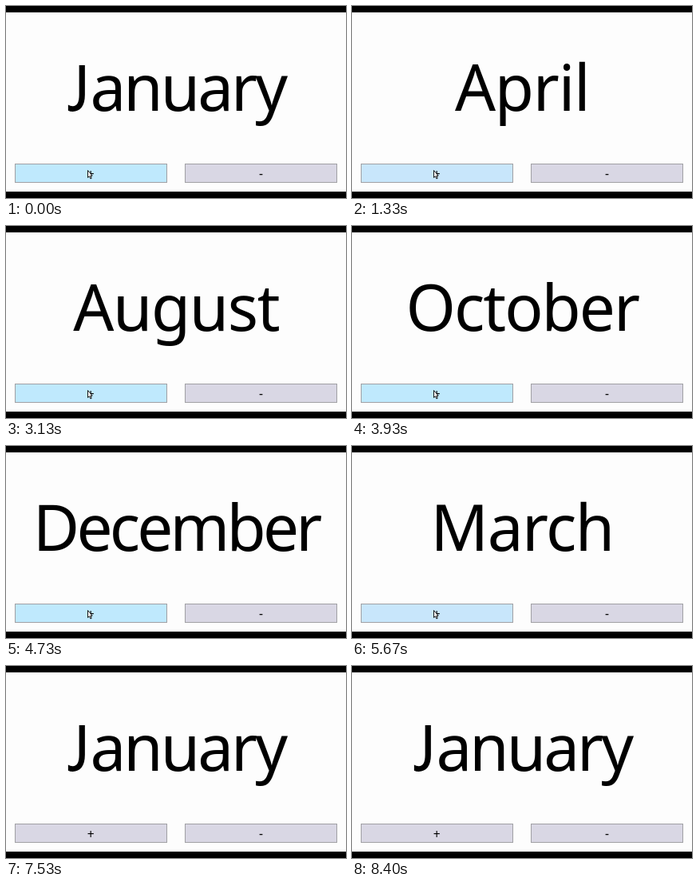
Write an HTML page that moves like this. It is 426x240 px and loops after 8.47 s.

```html
<!DOCTYPE html>
<html lang="en">
<head>
<meta charset="utf-8">
<title>Month stepper</title>
<style>
  html, body { margin: 0; width: 100%; height: 100%; overflow: hidden; background: #000; }
  svg { display: block; width: 100vw; height: 100vh; }
  text { font-family: "Noto Sans", "Open Sans", sans-serif; }
  .month { font-size: 80px; }
  .label { font-size: 15.5px; text-anchor: middle; }
  .button { stroke: #a0a0a4; stroke-width: 1; }
</style>
</head>
<body>
<svg id="stage" viewBox="0 0 426 240">
  <rect y="8" width="426" height="224" fill="#fdfdfd"/>
  <g id="months"></g>
  <rect id="plus" class="button" x="11.5" y="197.5" width="190" height="23"/>
  <rect id="minus" class="button" x="224.5" y="197.5" width="190" height="23"/>
  <text class="label" x="106.3" y="215.6">+</text>
  <text class="label" x="319.5" y="215.2">-</text>
  <path id="cursor" d="M0 0V9L1.9 7.3L3.4 10.4L4.7 9.8L3.3 6.7H5.7Z"
    fill="#fff" stroke="#000" stroke-width=".9"/>
  <rect width="426" height="8"/>
  <rect y="232" width="426" height="8"/>
</svg>
<script>
const LOOP = 8470, FRAME = LOOP / 127;
const CENTER = 213.2, BASELINE = 131, J_WIDTH = 29;
const PRESS = 140;
const COLORS = { idle: '#d9d7e4', hover: '#bfe9fd', pressed: '#c8e6fb' };

// name and letter spacing
const MONTHS = [
  ['January', -3], ['February', -2.6], ['March', -1.5], ['April', -1.2],
  ['May', -1.2], ['June', -2.8], ['July', -1.5], ['August', -1.4],
  ['September', -2.9], ['October', -2], ['November', -2.6], ['December', -3.8]
];

// time and direction of every click
const CLICKS = Array.from({ length: 14 }, (_, i) => [400 * (i + 1), 1])
  .concat([[6250, -1], [6500, -1]]);

// time and place of the pointer tip
const PATH = [
  [0, 102.5, 205.5], [5760, 102.5, 205.5], [6160, 286.5, 208.5],
  [7000, 286.5, 208.5], [7400, 300, 246], [LOOP, 300, 246]
];

const byId = id => document.getElementById(id);

function make(tag, parent, attrs = {}, text = '') {
  const el = document.createElementNS('http://www.w3.org/2000/svg', tag);
  for (const key in attrs) el.setAttribute(key, attrs[key]);
  el.textContent = text;
  return parent.appendChild(el);
}

// The J stands on the baseline, so it is drawn and its letter kept unpainted.
function makeMonth([name, spacing]) {
  const group = make('g', byId('months'));
  const text = make('text', group, { class: 'month', y: BASELINE });
  const hasJ = name[0] === 'J';
  const first = hasJ && make('tspan', text, { fill: 'none' }, 'J');
  const rest = make('tspan', text, { 'letter-spacing': spacing }, hasJ ? name.slice(1) : name);
  const lead = hasJ ? J_WIDTH : 0;
  const left = CENTER - (lead + rest.getComputedTextLength()) / 2;
  rest.setAttribute('x', left + lead);
  if (hasJ) {
    first.setAttribute('x', left);
    make('path', group, {
      d: 'M22.4 -57V-20C22.4 -6 16.5 .9 7.2 .9Q3.8 .9 1.4 -.3V-7.6' +
        'Q4 -5.8 7.2 -5.8C12.5 -5.8 15.2 -10.5 15.2 -20V-57Z',
      transform: `translate(${left} ${BASELINE})`
    });
  }
  return group;
}

function pointerAt(t) {
  const i = PATH.findIndex(p => p[0] > t);
  const [t0, x0, y0] = PATH[i - 1], [t1, x1, y1] = PATH[i];
  const u = (t - t0) / (t1 - t0), e = u * u * (3 - 2 * u);
  return [x0 + (x1 - x0) * e, y0 + (y1 - y0) * e];
}

function paintButton(id, left, [x, y], pressed) {
  const over = x >= left && x <= left + 191 && y >= 197 && y <= 221;
  byId(id).setAttribute('fill', COLORS[over ? (pressed ? 'pressed' : 'hover') : 'idle']);
}

const groups = MONTHS.map(makeMonth);

function draw(now) {
  const t = Math.floor((now % LOOP) / FRAME) * FRAME;
  const done = CLICKS.filter(c => c[0] <= t);
  const month = done.reduce((sum, c) => sum + c[1], 0) % 12;
  const pressed = done.length > 0 && t - done[done.length - 1][0] < PRESS;
  const tip = pointerAt(t);

  groups.forEach((g, i) => g.setAttribute('visibility', i === month ? 'visible' : 'hidden'));
  paintButton('plus', 11, tip, pressed);
  paintButton('minus', 224, tip, pressed);
  byId('cursor').setAttribute('transform', `translate(${tip[0]} ${tip[1]})`);
  byId('cursor').setAttribute('visibility', tip[1] < 232 ? 'visible' : 'hidden');
}

const start = performance.now();
function tick() {
  draw(performance.now() - start);
  requestAnimationFrame(tick);
}
tick();
</script>
</body>
</html>
```
